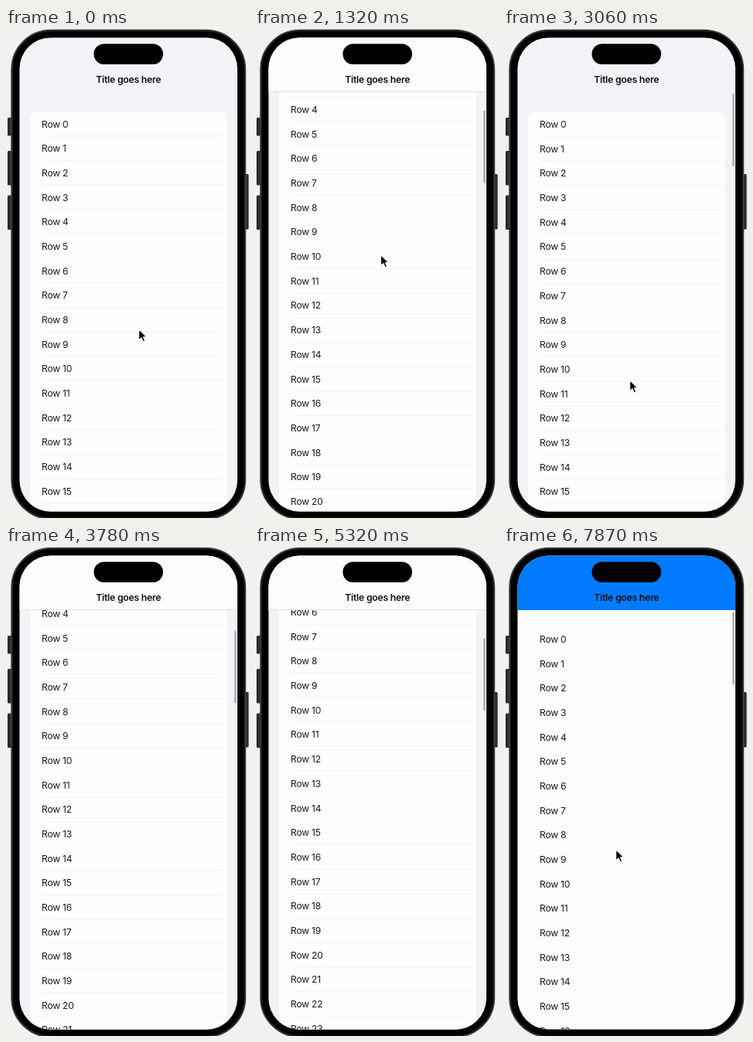
Animation, 314 px wide and 634 px high, one loop 7990 ms. Source, as an HTML page:

```html
<!DOCTYPE html>
<html lang="en">
<head>
<meta charset="utf-8">
<title>Scrolling list</title>
<style>
  html, body { margin: 0; width: 100%; height: 100%; overflow: hidden; background: #f1f1f2; }
  svg { display: block; position: absolute; left: 0; top: 0; }
  text { font: 400 12.24px Inter, "Liberation Sans", sans-serif; letter-spacing: -.3px; fill: #1c1c1e; }
  .title { font-weight: 600; letter-spacing: -.25px; fill: #111; }
</style>
</head>
<body>
<svg width="314" height="634" viewBox="0 0 314 634">
  <defs>
    <clipPath id="screen"><rect x="17.5" y="12.5" width="281.5" height="613" rx="40"/></clipPath>
    <clipPath id="belowBar"><rect x="17" y="82.5" width="283" height="544"/></clipPath>
  </defs>

  <g fill="#2b2b2d">
    <rect x="2" y="116" width="6" height="23.5" rx="1.5"/>
    <rect x="2" y="159" width="6" height="44.5" rx="1.5"/>
    <rect x="2" y="216.5" width="6" height="44.5" rx="1.5"/>
    <rect x="308" y="189" width="5.5" height="71.5" rx="1.5"/>
  </g>
  <rect x="7" y="2.5" width="302.5" height="633" rx="51" fill="#000" stroke="#4a4a4c" stroke-width="1.4"/>
  <rect x="8.4" y="3.9" width="299.7" height="630.2" rx="49.6" fill="none" stroke="#1e1e20" stroke-width="1.4"/>

  <g clip-path="url(#screen)">
    <rect id="page" x="17" y="12" width="283" height="615"/>
    <g clip-path="url(#belowBar)">
      <g id="list"><rect id="card" x="31" y="108" width="254.5" height="3168" rx="7" fill="#fefefe"/></g>
    </g>
    <g id="navBar">
      <rect id="navFill" x="17" y="12" width="283" height="71"/>
      <rect id="navLine" x="17" y="82" width="283" height=".8" fill="#dcdcdf"/>
    </g>
    <text class="title" x="158.3" y="71.2" text-anchor="middle">Title goes here</text>
    <rect id="thumb" x="295.2" width="2.4" height="94" rx="1.2" fill="#a9a9ad"/>
  </g>
  <rect x="113.5" y="20.5" width="89.5" height="26.5" rx="13.2" fill="#000"/>

  <path id="cursor" d="M.6 .8V14.8L3.9 11.8L6.2 17L8.6 16L6.400 10.900H10.800Z"
        fill="#000" stroke="#fff" stroke-width="1.1" stroke-linejoin="round"/>
</svg>

<script>
const LOOP = 7990;
const PITCH = 31.68;
const CARD_TOP = 108;
const GRAB_Y = 438;      // where the pointer takes hold of the list
const RELEASE = 3300;    // the flick lets go here and coasts until COAST_END
const COAST_END = 5320;
const RESTYLE = 7510;    // hard switch to the blue bar

const $ = id => document.getElementById(id);
const clamp = (v, lo = 0, hi = 1) => Math.min(hi, Math.max(lo, v));
const mix = (a, b, u) => a + (b - a) * u;
const span = (t, from, to) => clamp((t - from) / (to - from));
const smooth = u => u * u * (3 - 2 * u);
const easeOut = u => 1 - (1 - u) ** 3;

// time, x, y
const pointerKeys = [
  [0, 171, 389], [240, 170, GRAB_Y], [1680, 160.5, 266], [2640, 162, 447],
  [3060, 162, 455], [3180, 195, 330], [3300, 302, 30], [3420, 330, 70],
  [5780, 330, 316], [5810, 231, 317.5], [5930, 141, 319], [6540, 141, 319],
  [7150, 134, 212], [7390, 137, 255], [7700, 144, 395], [7870, 144, 392], [LOOP, 144, 392]
];

// time, opacity
const thumbKeys = [
  [0, 0], [240, 0], [400, 1], [6940, 1], [7130, 0], [7690, 0], [7780, 1], [LOOP, 1]
];

function sample(keys, t) {
  let i = 1;
  while (i < keys.length - 1 && t >= keys[i][0]) i++;
  const a = keys[i - 1], b = keys[i];
  const u = smooth(span(t, a[0], b[0]));
  return a.slice(1).map((v, k) => mix(v, b[k + 1], u));
}

const coast = t => 230.8 - 196 * Math.exp((RELEASE - Math.min(t, COAST_END)) / 450);

function scrollAt(t, pointerY) {
  if (t < 240) return 0;
  if (t < 2640) {
    const drag = GRAB_Y - pointerY;
    return drag < 0 ? drag / 2 : drag;
  }
  if (t < 3060) return mix(-4.5, -.5, smooth(span(t, 2640, 3060)));
  if (t < RELEASE) return mix(-.5, coast(RELEASE), span(t, 3060, RELEASE) ** 2);
  if (t < 6480) return coast(t);
  if (t < RESTYLE) return mix(coast(COAST_END), 0, easeOut(span(t, 6480, 6960)));
  return 3.7 * span(t, 7700, 7870);
}

function add(parent, tag, attrs, content = "") {
  const el = document.createElementNS("http://www.w3.org/2000/svg", tag);
  for (const name in attrs) el.setAttribute(name, attrs[name]);
  el.textContent = content;
  parent.append(el);
  return el;
}

const dividers = add($("list"), "g", { fill: "#f0f0f2" });
for (let row = 0; row < 26; row++) {
  const top = CARD_TOP + row * PITCH;
  add($("list"), "text", { x: 46, y: top + 20.6 }, "Row " + row);
  add(dividers, "rect", { x: 46, y: top + PITCH - .4, width: 235, height: .8 });
}

function draw(t) {
  const [x, y] = sample(pointerKeys, t);
  const offset = scrollAt(t, y);
  const blue = t >= RESTYLE;
  const plainOnly = blue ? "none" : "";

  $("cursor").setAttribute("transform", `translate(${x} ${y})`);
  $("list").setAttribute("transform", `translate(0 ${-offset})`);
  $("page").setAttribute("fill", blue ? "#fcfcfc" : "#f2f2f7");
  $("navFill").setAttribute("fill", blue ? "#007aff" : "#fcfcfd");
  $("navBar").setAttribute("opacity", blue ? 1 : clamp(offset / 24));
  $("card").style.display = dividers.style.display = $("navLine").style.display = plainOnly;
  $("thumb").setAttribute("y", 85 + Math.max(0, offset) * .15);
  $("thumb").setAttribute("opacity", sample(thumbKeys, t)[0]);
}

const start = performance.now();
function tick() {
  draw((performance.now() - start) % LOOP);
  requestAnimationFrame(tick);
}
tick();
</script>
</body>
</html>
```
